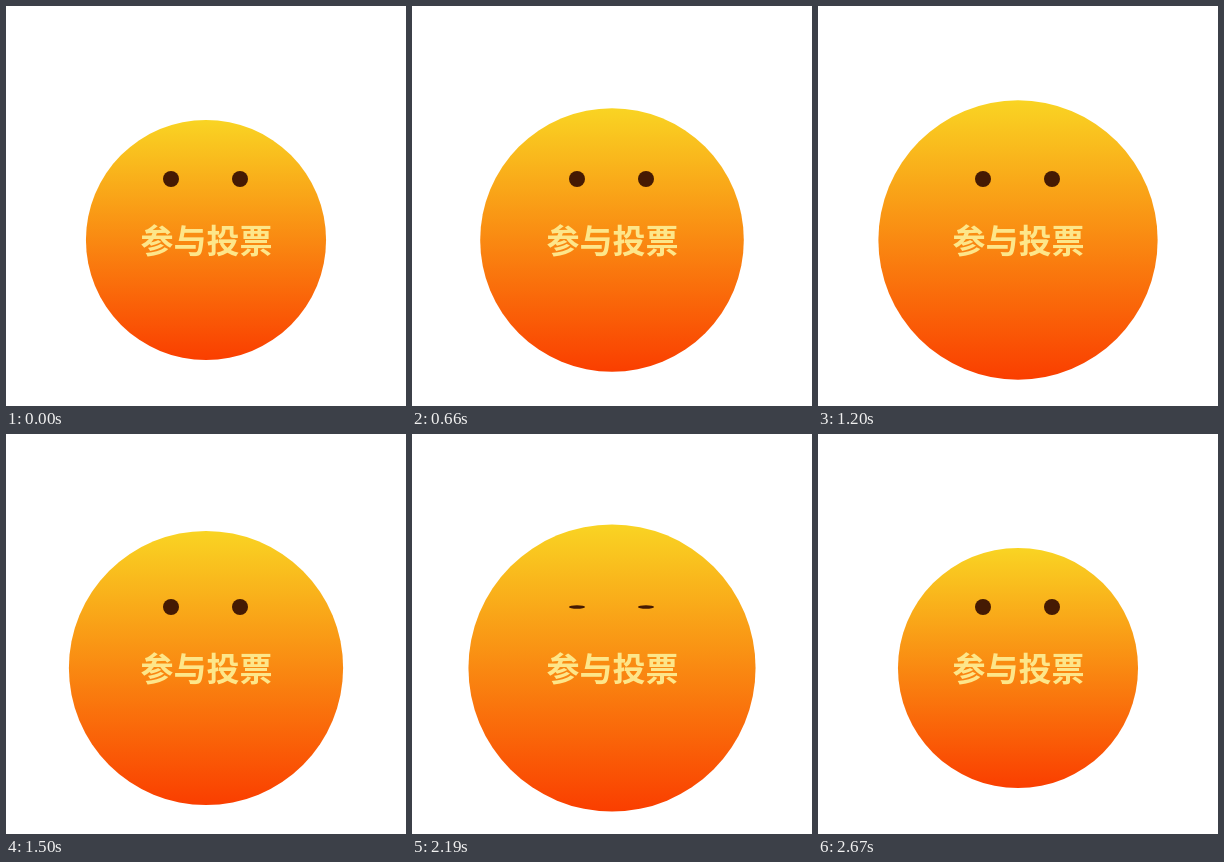
An HTML page for the animation above (2700 ms loop, 400 px wide and 400 px high).

```html
<!DOCTYPE html>
<html lang="zh-CN">
<meta charset="utf-8">
<style>
  html, body { margin: 0; height: 100%; overflow: hidden; background: #fff; }
  svg { display: block; width: 100vw; height: 100vh; }
  text { font: 900 33px "Noto Sans CJK SC", "Noto Sans CJK", sans-serif; text-anchor: middle; fill: #fde68a; }
</style>
<svg viewBox="0 0 400 400">
  <linearGradient id="sunset" x2="0" y2="1">
    <stop stop-color="#f9d423"/>
    <stop offset="1" stop-color="#fa3e00"/>
  </linearGradient>
  <circle id="face" cx="200" cy="234" r="120" fill="url(#sunset)"/>
  <g fill="#451a03">
    <ellipse class="eye" cx="165" cy="173" rx="8" ry="8"/>
    <ellipse class="eye" cx="234" cy="173" rx="8" ry="8"/>
  </g>
  <text x="200.5" y="247">参与投票</text>
</svg>
<script>
  const LOOP = 2700, BEAT = 900, LEAD = 16;
  const BLINK_AT = 2190, BLINK_HALF = 120;
  const face = document.getElementById('face');
  const eyes = document.querySelectorAll('.eye');

  // CSS ease-in-out, cubic-bezier(.42, 0, .58, 1), solved by bisection
  function easeInOut(x) {
    let low = 0, high = 1;
    for (let i = 0; i < 20; i++) {
      const s = (low + high) / 2, r = 1 - s;
      if (1.26 * s * r * r + 1.74 * s * s * r + s ** 3 < x) low = s;
      else high = s;
    }
    return low * low * (3 - 2 * low);
  }

  function draw(now) {
    const t = now % LOOP;
    const beat = (t + LEAD) % BEAT / BEAT;
    face.setAttribute('r', 120 + 24 * easeInOut(1 - Math.abs(2 * beat - 1)));

    const closed = easeInOut(Math.max(0, 1 - Math.abs(t - BLINK_AT) / BLINK_HALF));
    eyes.forEach(eye => eye.setAttribute('ry', 8 - 6.2 * closed));
  }

  const start = performance.now();
  (function tick() {
    draw(performance.now() - start);
    requestAnimationFrame(tick);
  })();
</script>
</html>
```
